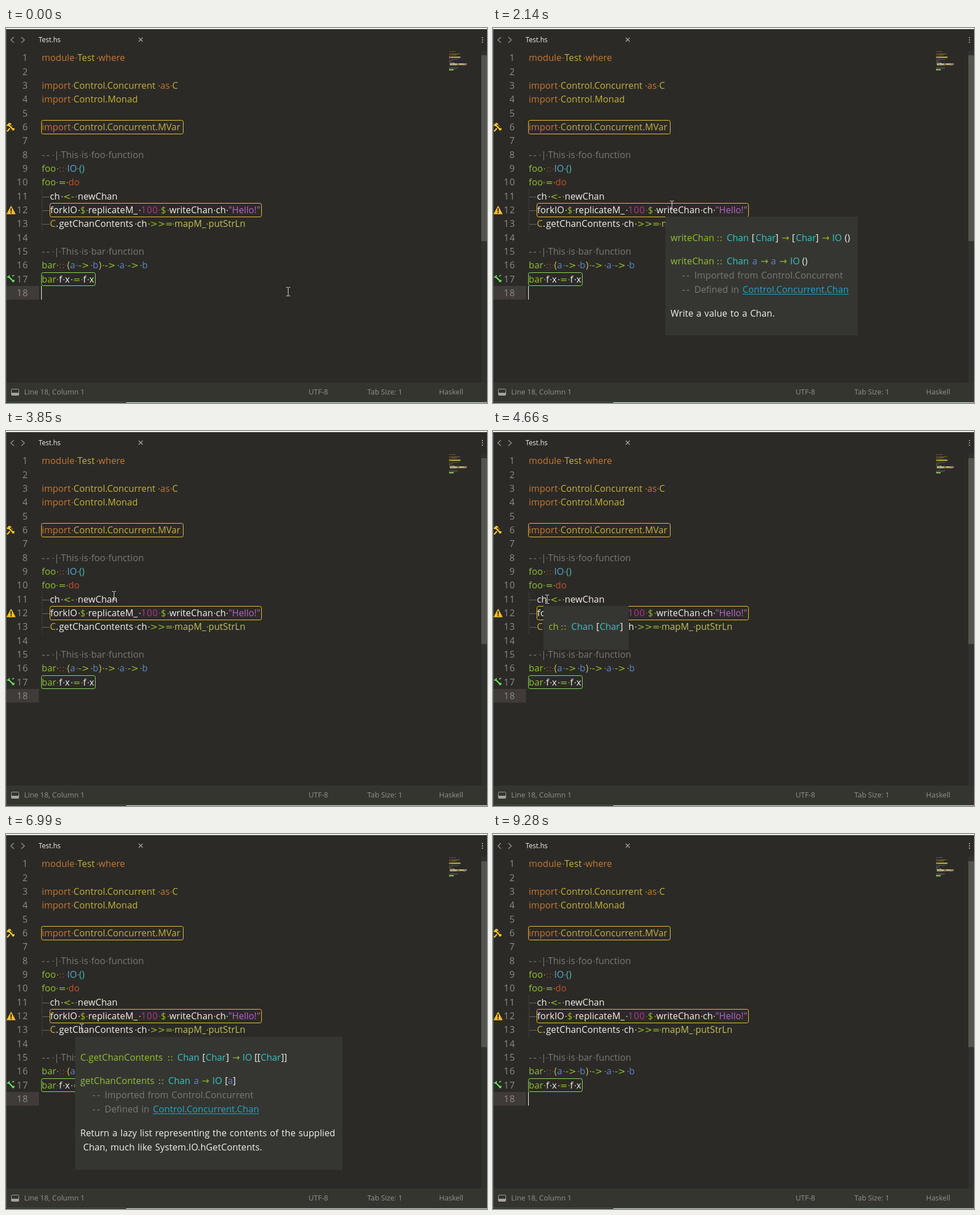
Animation of 848x660 px, one loop 9.38 s. Source, as an HTML page with a canvas:

```html
<!DOCTYPE html>
<html lang="en">
<head>
<meta charset="utf-8">
<title>Test.hs</title>
<style>
html, body { margin: 0; width: 100%; height: 100%; overflow: hidden; background: #2b2a27; }
canvas { display: block; width: 848px; height: 660px; }
</style>
</head>
<body>
<canvas id="stage" width="848" height="660"></canvas>
<script>
(() => {
const ctx = document.getElementById('stage').getContext('2d', { alpha: false });
const LOOP = 9380;
const CODE = '16px "Open Sans", "Noto Sans", sans-serif';
const OPS = '16px "DejaVu Sans", sans-serif';
const UI = '"Open Sans", "Noto Sans", sans-serif';

const C = {
  key: '#c9782f', type: '#c6b337', name: '#93c132', op: '#92b82c', sig: '#8d4325',
  io: '#58aad2', unit: '#45c2b0', do: '#c4502a', text: '#f3f2ec', num: '#bb3392',
  str: '#b965c8', fn: '#c3c255', var: '#5b86cf', note: '#7b7a76', tip: '#36c5c9',
  link: '#1aa9cd', warn: '#f4c531', hint: '#8be05c', line: '#8d8c87', popup: '#353631'
};

// Each line: [x, text, colour, glued to the previous word]
const lines = {
  1: [[63, 'module', 'key'], [126, 'Test', 'type'], [163, 'where', 'key']],
  3: [[63, 'import', 'key'], [119, 'Control.Concurrent', 'type'], [272, 'as', 'key'], [293, 'C', 'type']],
  4: [[63, 'import', 'key'], [119, 'Control.Monad', 'type']],
  6: [[63, 'import', 'key'], [119, 'Control.Concurrent.MVar', 'type']],
  8: [[63, '--', 'note'], [85, '|', 'note'], [97, 'This is foo function', 'note']],
  9: [[63, 'foo', 'name'], [93, '::', 'sig'], [108, 'IO', 'io'], [129, '()', 'unit']],
  10: [[63, 'foo', 'name'], [92.5, '=', 'op'], [110, 'do', 'do']],
  11: [[77.5, 'ch', 'text'], [101, '<-', 'op'], [126.5, 'newChan', 'text']],
  12: [[78, 'forkIO', 'text'], [131, '$', 'op'], [145, 'replicateM_', 'text'], [238, '100', 'num'],
    [273, '$', 'op'], [288, 'writeChan', 'text'], [370, 'ch', 'text'], [392, '"Hello!"', 'str']],
  13: [[77.5, 'C', 'type'], [88, '.', 'text', true], [93.5, 'getChanContents', 'text', true], [231, 'ch', 'text'],
    [254, '>>=', 'op'], [297, 'mapM_', 'fn'], [357, 'putStrLn', 'fn']],
  15: [[63, '--', 'note'], [85, '|', 'note'], [97, 'This is bar function', 'note']],
  16: [[63, 'bar', 'name'], [93, '::', 'sig'], [108, '(', 'fn'], [113, 'a', 'var', true], [127.5, '->', 'op'],
    [153, 'b', 'var'], [163.5, ')', 'fn', true], [174, '->', 'op'], [200, 'a', 'var'], [214.5, '->', 'op'], [240, 'b', 'var']],
  17: [[63, 'bar', 'name'], [93.5, 'f', 'text'], [104, 'x', 'text'], [118, '=', 'op'], [136, 'f', 'text'], [147, 'x', 'text']]
};

// Rows of a popup: [baseline, x, text, colour]
const popups = [
  { from: 2000, to: 3600, box: [304, 332, 339, 209], rows: [
    [375, 313, 'writeChan', 'name'], [375, 394, '::', 'op'], [375, 412, 'Chan', 'tip'], [375, 456, '[', 'text'],
    [375, 463, 'Char', 'tip'], [375, 498, ']', 'text'], [375, 509, '→', 'op'], [375, 527, '[', 'text'],
    [375, 534, 'Char', 'tip'], [375, 569, ']', 'text'], [375, 580, '→', 'op'], [375, 598, 'IO', 'tip'], [375, 620, '()', 'text'],
    [416, 313, 'writeChan', 'name'], [416, 394, '::', 'op'], [416, 412, 'Chan', 'tip'], [416, 457, 'a', 'var'],
    [416, 472, '→', 'op'], [416, 490, 'a', 'var'], [416, 505, '→', 'op'], [416, 524, 'IO', 'tip'], [416, 545, '()', 'text'],
    ...moduleRows(441, 333), [508, 313, 'Write a value to a Chan.', 'text']] },
  { from: 4660, to: 6080, box: [89, 308, 150, 77], rows: [
    [350, 98, 'ch', 'name'], [350, 119, '::', 'op'], [350, 138, 'Chan', 'tip'], [350, 182, '[', 'text'],
    [350, 188, 'Char', 'tip'], [350, 224, ']', 'text']] },
  { from: 6990, to: 8300, box: [122, 357, 471, 234], rows: [
    [399, 131, 'C.getChanContents', 'name'], [399, 284, '::', 'op'], [399, 302, 'Chan', 'tip'], [399, 346, '[', 'text'],
    [399, 352, 'Char', 'tip'], [399, 388, ']', 'text'], [399, 399, '→', 'op'], [399, 417, 'IO', 'tip'],
    [399, 438, '[[', 'text'], [399, 449, 'Char', 'tip'], [399, 485, ']]', 'text'],
    [440, 131, 'getChanContents', 'name'], [440, 268, '::', 'op'], [440, 286, 'Chan', 'tip'], [440, 331, 'a', 'var'],
    [440, 345, '→', 'op'], [440, 364, 'IO', 'tip'], [440, 386, '[', 'text'], [440, 391, 'a', 'var'], [440, 400, ']', 'text'],
    ...moduleRows(465, 152),
    [532, 131, 'Return a lazy list representing the contents of the supplied', 'text'],
    [557, 136, 'Chan, much like System.IO.hGetContents.', 'text']] }
];

// Pointer stops: [time, x, y]
const pointer = [
  [0, 497, 464], [800, 448, 445], [930, 351, 409], [1060, 342, 385], [1190, 338, 361], [1320, 330, 338],
  [1460, 320, 318], [1590, 315, 312], [3470, 303, 304], [3600, 260, 298], [3730, 190, 290], [3870, 130, 286],
  [4000, 105, 290], [4270, 95, 296], [5540, 93, 305], [5670, 91, 318], [5830, 88, 335], [5960, 87, 350],
  [6080, 45, 350], [6200, 8, 345], [6320, 35, 344], [6440, 95, 343], [6560, 133, 342],
  [8040, 170, 365], [8170, 270, 430], [8300, 390, 500], [8440, 470, 545], [8570, -50, 0]
];

// Caret: half on, fully on, half off, off
const blinks = [
  [0, 0, 130, 280], [800, 930, 1340, 1340], [1870, 2000, 2250, 2380], [2930, 2930, 3340, 3340],
  [3870, 4000, 4270, 4400], [4930, 5050, 5410, 5540], [5960, 5960, 6440, 6560],
  [7120, 7120, 7390, 7510], [7910, 8040, 8440, 8570], [9130, 9280, LOOP, LOOP]
];

function moduleRows(y, x) {
  return [[y, x, '--', 'note'], [y, x + 22, 'Imported from Control.Concurrent', 'note'],
    [y + 25, x, '--', 'note'], [y + 25, x + 22, 'Defined in', 'note'],
    [y + 25, x + 107, 'Control.Concurrent.Chan', 'link']];
}

function rect(x, y, w, h, color) {
  ctx.fillStyle = color;
  ctx.fillRect(x, y, w, h);
}

function stroke(points, color, width = 1) {
  ctx.strokeStyle = color;
  ctx.lineWidth = width;
  ctx.beginPath();
  points.forEach(([x, y]) => ctx.lineTo(x, y));
  ctx.stroke();
}

function outline(x, y, w, h, color, r = 3) {
  ctx.strokeStyle = color;
  ctx.lineWidth = 1;
  ctx.beginPath();
  ctx.roundRect(x + 0.5, y + 0.5, w - 1, h - 1, r);
  ctx.stroke();
}

function word(x, y, text, color) {
  const op = /^[-<>=:→]+$/.test(text);
  ctx.font = op ? OPS : CODE;
  ctx.letterSpacing = text === '--' ? '2.3px' : /^\d+$/.test(text) ? '1px' : op ? '0px' : '0.1px';
  ctx.wordSpacing = '1px';
  ctx.fillStyle = color;
  ctx.fillText(text, x, y);
}

function label(x, text, y, size, color) {
  ctx.font = size + 'px ' + UI;
  ctx.letterSpacing = ctx.wordSpacing = '0px';
  ctx.fillStyle = color;
  ctx.fillText(text, x, y);
}

const baseline = n => Math.round(58.4 + (n - 1) * 24.33);

function dot(x, y, color) {
  ctx.globalAlpha = 0.65;
  rect(Math.round(x), y - 6, 2, 2, color);
  ctx.globalAlpha = 1;
}

function drawCode() {
  rect(1, 454, 57, 24, '#403b38');
  for (let n = 1; n <= 18; n++) word(n < 10 ? 29 : 19, baseline(n), String(n), C.line);
  for (const n in lines) {
    const y = baseline(n);
    lines[n].forEach(([x, text, color, glued], i) => {
      if (i && !glued) dot(x - 3.5, y, C[lines[n][i - 1][2]]);
      word(x, y, text, C[color]);
      for (let k = text.indexOf(' '); k > 0; k = text.indexOf(' ', k + 1))
        dot(x + ctx.measureText(text.slice(0, k)).width + 2, y, C[color]);
    });
  }
  for (let n = 11; n <= 13; n++) rect(64, baseline(n) - 5, 13, 1, '#6a6963');
  for (let y = 284; y < 357; y += 2) rect(63, y, 1, 1, '#55544e');
  outline(62, 162, 251, 25, C.warn);
  outline(77, 308, 374, 25, C.warn);
  outline(62, 430, 96, 24, C.hint);
}

function wrench(y, color) {
  stroke([[4, y - 4], [14, y + 6]], '#11110f', 5);
  stroke([[4, y - 4], [14, y + 6]], color, 2.6);
  stroke([[2, y - 3], [5, y - 2], [6, y - 6]], color, 2);
  stroke([[11, y + 6], [13, y + 3], [15, y + 4]], color, 2);
}

function drawIcons() {
  stroke([[2, 182], [11, 172]], C.warn, 2.5);
  wrench(174, C.warn);
  stroke([[2, 172], [6, 168], [9, 170]], C.warn, 2.5);
  wrench(441, '#6fd360');
  stroke([[11, 437], [14, 435]], '#6fd360', 2);
  ctx.fillStyle = ctx.strokeStyle = '#f6bd22';
  ctx.lineJoin = 'round';
  ctx.lineWidth = 1.5;
  ctx.beginPath();
  ctx.moveTo(9, 314);
  ctx.lineTo(16, 327);
  ctx.lineTo(2, 327);
  ctx.closePath();
  ctx.fill();
  ctx.stroke();
  rect(8, 317, 2, 6, '#25231d');
  rect(8, 324, 2, 2, '#25231d');
}

function drawMinimap() {
  rect(781, 50, 20, 3, '#8d8038');
  rect(783, 62, 29, 3, '#8d8038');
  rect(781, 72, 8, 3, '#568344');
  for (const n in lines)
    for (const [x, text, color] of lines[n]) {
      ctx.globalAlpha = n == 6 || n == 12 || n == 17 ? 1 : 0.55;
      rect(781 + (x - 63) / 12.4, 39 + n * 2, Math.max(1, text.length * 0.7), 1, C[color]);
    }
  ctx.globalAlpha = 1;
}

function drawWindow() {
  rect(0, 0, 848, 660, '#2b2a27');
  stroke([[14, 16], [8.5, 21], [14, 26]], '#94938e', 1.4);
  stroke([[27, 16], [32.5, 21], [27, 26]], '#94938e', 1.4);
  label(57.5, 'Test.hs', 25, 12, '#f2f1ec');
  stroke([[234, 17], [241, 24]], '#aaa9a4', 1.3);
  stroke([[241, 17], [234, 24]], '#aaa9a4', 1.3);
  for (let y = 16; y <= 24; y += 4) rect(839, y, 2, 2, '#a09f9a');
  rect(838, 40, 10, 584, '#31312d');
  rect(838, 48, 10, 327, '#555550');
  rect(0, 624, 848, 35, '#34352f');
  outline(9, 635, 14, 12, '#a5a49e', 1);
  rect(10, 642, 12, 4, '#a5a49e');
  const foot = [[32, 'Line 18, Column 1'], [533.5, 'UTF-8'], [637, 'Tab Size: 1'], [763.5, 'Haskell']];
  for (const [x, text] of foot) label(x, text, 645, 12.8, '#92928b');
  rect(0, 0, 848, 2, '#f1f3f0');
  rect(0, 2, 1, 657, '#52635a');
  rect(0, 658, 848, 1, '#51615a');
  rect(0, 659, 212, 1, '#1c1c1a');
  rect(212, 659, 636, 1, '#d4d6d2');
}

function drawPopup({ box, rows }) {
  rect(...box, C.popup);
  for (const [y, x, text, color] of rows) {
    word(x, y, text, C[color]);
    if (color === 'link') rect(x, y + 2, Math.round(ctx.measureText(text).width), 1, C.link);
  }
}

function drawPointer(x, y) {
  const shape = [[-3, -8, 3, 1], [1, -8, 3, 1], [0, -7, 1, 14], [-3, 7, 3, 1], [1, 7, 3, 1]];
  for (const [dx, dy, w, h] of shape) rect(x + dx, y + dy, w, h, '#deded9');
}

function caretAlpha(t) {
  const b = blinks.find(([start, , , end]) => t >= start && t < end);
  return !b ? 0 : t >= b[1] && t < b[2] ? 1 : 0.5;
}

function draw(t) {
  drawWindow();
  drawMinimap();
  drawCode();
  drawIcons();
  ctx.globalAlpha = caretAlpha(t);
  rect(62, 454, 1, 24, '#f8f8f2');
  ctx.globalAlpha = 1;
  popups.filter(p => t >= p.from && t < p.to).forEach(drawPopup);
  const [, x, y] = pointer.filter(p => p[0] <= t).pop();
  drawPointer(x, y);
}

const began = performance.now();
function tick() {
  draw(Math.max(0, performance.now() - began) % LOOP);
  requestAnimationFrame(tick);
}
tick();
})();
</script>
</body>
</html>
```
